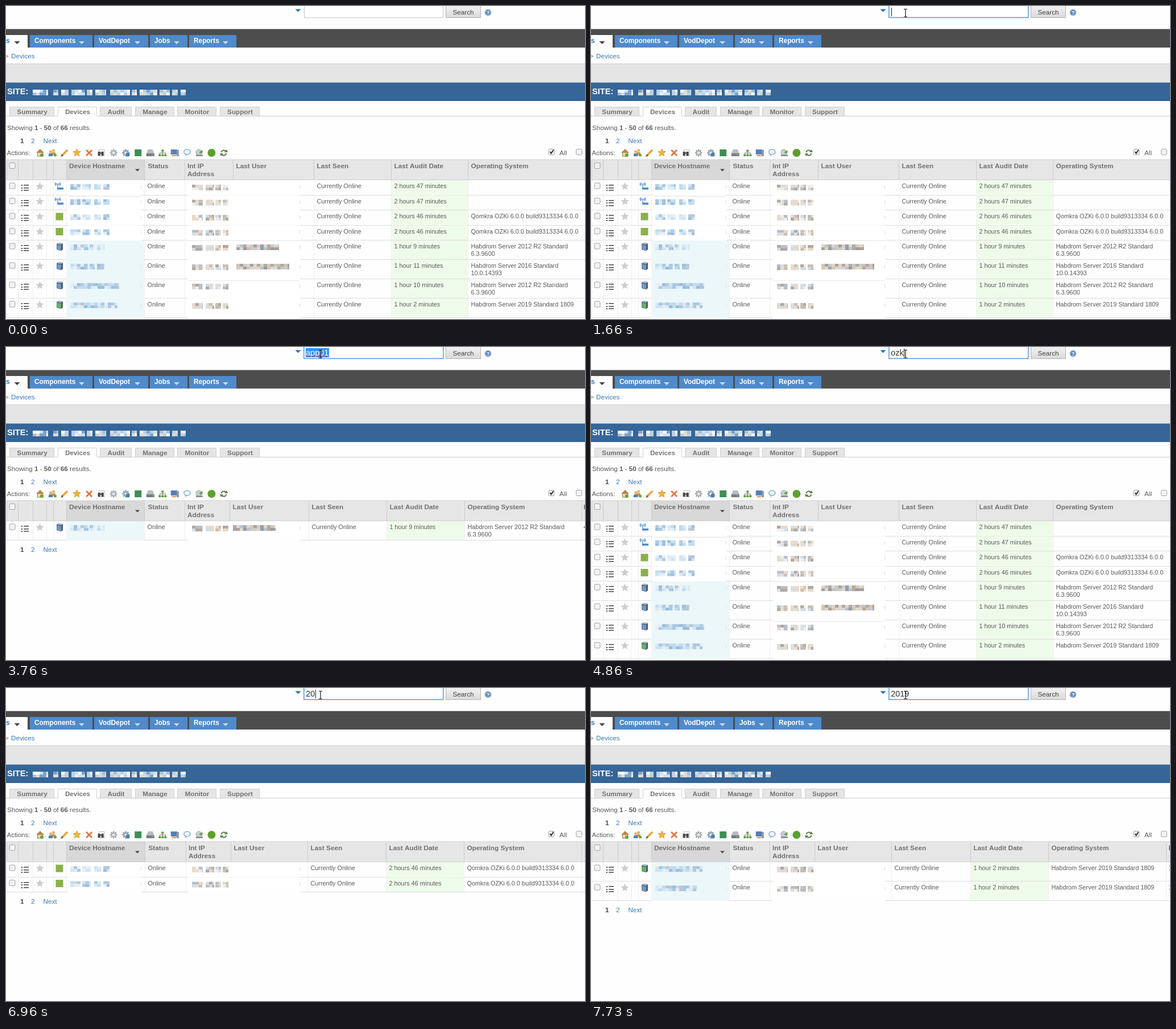
An HTML page with a canvas that plays this animation: 1018x550 px, repeating every 8 s.

```html
<!DOCTYPE html>
<html lang="en">
<head>
<meta charset="utf-8">
<title>Device list search</title>
<style>
html, body { margin: 0; width: 100%; height: 100%; overflow: hidden; background: #fff; }
canvas { display: block; }
</style>
</head>
<body>
<canvas id="stage" width="1018" height="550"></canvas>
<script>
const ctx = document.getElementById('stage').getContext('2d');
const LOOP = 8000;
const FONT = '"Liberation Sans", Arial, sans-serif';
const LINK = '#3a78b8';

// ---- drawing helpers
function box(x, y, w, h, fill) { ctx.fillStyle = fill; ctx.fillRect(x, y, w, h); }
function frame(x, y, w, h, color, width = 1) {
  ctx.strokeStyle = color; ctx.lineWidth = width; ctx.strokeRect(x, y, w, h);
}
function text(s, x, y, color = '#5a5a5a', size = 10.85, bold = false) {
  ctx.font = `${bold ? 'bold ' : ''}${size}px ${FONT}`;
  ctx.fillStyle = color;
  ctx.fillText(s, x, y);
  return x + ctx.measureText(s).width;
}
function path(points, fill, stroke, width = 1) {
  ctx.beginPath();
  for (let i = 0; i < points.length; i += 2) ctx.lineTo(points[i], points[i + 1]);
  if (fill) { ctx.closePath(); ctx.fillStyle = fill; ctx.fill(); }
  if (stroke) { ctx.strokeStyle = stroke; ctx.lineWidth = width; ctx.stroke(); }
}
function disc(x, y, r, fill, stroke, width = 1) {
  ctx.beginPath(); ctx.arc(x, y, r, 0, 7);
  if (fill) { ctx.fillStyle = fill; ctx.fill(); }
  if (stroke) { ctx.strokeStyle = stroke; ctx.lineWidth = width; ctx.stroke(); }
}
function down(x, y, r, fill) { path([x - r, y, x + r, y, x, y + r], fill); }
function star(x, y, r, fill, stroke) {
  const points = [];
  for (let i = 0; i < 10; i++) {
    const a = i * Math.PI / 5 - Math.PI / 2, d = i % 2 ? r * 0.45 : r;
    points.push(x + d * Math.cos(a), y + d * Math.sin(a));
  }
  points.push(points[0], points[1]);
  path(points, fill, stroke, 0.8);
}
function checkbox(x, y, checked) {
  ctx.beginPath(); ctx.roundRect(x - 4.5, y - 4.5, 10, 10, 2);
  ctx.fillStyle = '#f2f2f2'; ctx.fill();
  ctx.strokeStyle = '#a3a3a3'; ctx.lineWidth = 1; ctx.stroke();
  if (checked) path([x - 2, y, x, y + 3, x + 4, y - 3], null, '#333', 2);
}
const noise = n => { const v = Math.sin(n * 12.9898) * 43758.5453; return v - Math.floor(v); };

const PALETTE = {
  site: ['#ffffff', '#cfe0ef', '#a5c1dc', '#7ba3cc', '#e9eff5', '#b9d0e5', '#dedcd2'],
  host: ['#dbe8f3', '#a9c8e2', '#cfe3f2', '#9bbedd', '#e5eff7', '#b9c9d8', '#c0dcf0'],
  ip: ['#e5ddd5', '#cdbfb1', '#d5dde3', '#b9bec5', '#eeeeee', '#afa9a3', '#e8d9c8'],
  user: ['#d3c7b8', '#a9a29a', '#c5ccd5', '#989ca2', '#ddd7cf', '#b5aa9b', '#b9c3d0']
};
// Two rows of blocks over each [from, to] span
function mosaic(y, spans, palette, seed, size = 5) {
  for (const [from, to] of spans)
    for (let x = from; x < to; x += 6)
      for (let r = 0; r < 2; r++) {
        const color = palette[Math.floor(noise(x * 1.7 + r * 31 + seed * 7.3) * palette.length)];
        box(x, y + r * size, Math.min(6, to - x), size, color);
      }
}

// ---- table content
const netHost = [[113, 131], [134, 149], [155, 167], [171, 182]];
const appHost = [[113, 145], [147, 156], [160, 173]];
const longIp = [[327, 346], [351, 366], [368, 378], [381, 391]];
const hypervisor = ['Qomkra OZKi 6.0.0 build9313334 6.0.0'];
const server = (name, ...more) => ['Habdrom Server ' + name, ...more];
const old = server('2012 R2 Standard', '6.3.9600');

const row = (seed, icon, host, audit, os, user = 0) =>
  ({ seed, icon, host, audit, os, user, height: icon === 'net' || icon === 'hyper' ? 26.5 : 34 });
const net1 = row(1, 'net', netHost, '2 hours 47 minutes', []);
const net2 = row(2, 'net', netHost, '2 hours 47 minutes', []);
const hyper1 = row(3, 'hyper', netHost, '2 hours 46 minutes', hypervisor);
const hyper2 = row(4, 'hyper', netHost, '2 hours 46 minutes', hypervisor);
const app1 = row(5, 'server', appHost, '1 hour 9 minutes', old, 75);
const app2 = row(6, 'server', appHost, '1 hour 11 minutes', server('2016 Standard', '10.0.14393'), 93);
const plain = row(7, 'server', [[113, 199]], '1 hour 10 minutes', old);
const new1 = row(8, 'greenServer', [[113, 196]], '1 hour 2 minutes', server('2019 Standard 1809'));
const new2 = row(9, 'server', [[113, 186]], '1 hour 2 minutes', server('2019 Standard 1809'));

// cols: left edges of status, address, user, seen, audit, system, next column
const fullCols = [243, 314, 399, 541, 677, 812, 1030];
const views = {
  all: { rows: [net1, net2, hyper1, hyper2, app1, app2, plain, new1], cols: fullCols, full: true },
  app: { rows: [app1, app2], cols: [243, 314, 393, 534, 671, 808, 1013] },
  app01: { rows: [app1], cols: [243, 314, 393, 532, 669, 806, 1012], extra: '4' },
  hyper: { rows: [hyper1, hyper2], cols: [244, 316, 395, 530, 668, 805, 1012] },
  servers: { rows: [app1, app2, plain, new1, new2, plain, new1], cols: fullCols, full: true },
  new: { rows: [new1, new2], cols: [243, 314, 393, 528, 667, 804, 1011], extra: '1' }
};

// ---- timelines
const viewSteps = [[0, 'all'], [2740, 'app'], [2970, 'app01'], [4860, 'all'],
  [5010, 'hyper'], [7120, 'servers'], [7270, 'new']];
// time, typed text, caret index (-1 hidden), selected
const inputSteps = [
  [0, '', -1], [1660, '', 0], [2190, 'a', 1], [2450, 'ap', 2], [2590, 'app', 3], [2740, 'app0', 4],
  [2820, 'app01', 5], [3370, 'app01', -1], [3700, 'app01', 3], [3760, 'app01', -1, true],
  [4620, 'oz', 2], [4860, 'ozk', 3], [5560, 'ozk', -1], [5880, 'ozk', -1, true],
  [6960, '20', 2], [7040, '201', 3], [7190, '2019', 4], [7730, '2019', -1]
];
const stepAt = (steps, t) => steps.filter(s => s[0] <= t).pop();

// ---- page parts
function searchBar(t) {
  const [, typed, caret, selected] = stepAt(inputSteps, t);
  down(513.5, 5.5, 5, '#2374bb');
  box(524, 0, 245, 20, '#fff');
  if (t < 1660) frame(524.5, -3.5, 244, 24, '#c6c6c6');
  else frame(523.8, -3, 245, 23.3, '#6a9fe8', 1.7);
  ctx.font = `14.4px ${FONT}`;
  const widthOf = n => ctx.measureText(typed.slice(0, n)).width;
  const caretX = Math.round(527.5 + widthOf(Math.max(caret, 0)));
  if (selected) box(527, 2, widthOf(typed.length) + 1, 16, '#3390ff');
  text(typed, 527.3, 15, selected ? '#fff' : '#333', 14.4);
  if (selected && typed === 'app01') path([528, 17, 566, 17], null, '#d33a4a', 1);
  if (caret >= 0) box(caretX, 3, 1, 15, '#222');

  const g = ctx.createLinearGradient(0, 0, 0, 21);
  g.addColorStop(0, '#f1f1f1'); g.addColorStop(1, '#d9d9d9');
  box(773, 0, 62, 21, g);
  frame(773.5, -3, 61, 23.5, '#b5b5b5');
  text('Search', 785.5, 14.5, '#444', 11.7);
  disc(847.5, 11.5, 5.5, '#5a88be', '#b4c7dc', 1.5);
  text('?', 844.8, 15, '#fff', 9.5, true);
}

function navigation() {
  box(0, 40.5, 1018, 32.5, '#4d4d4d');
  box(0, 51, 38, 22, '#fff');
  text('s', 0, 65, LINK, 11.9, true);
  down(19.5, 62, 5, '#444');
  const tabs = [['Components', 42, 152, 50], ['VodDepot', 155, 250, 163], ['Jobs', 253, 319, 261], ['Reports', 322, 405, 330]];
  for (const [label, from, to, x] of tabs) {
    box(from, 51, to - from, 22, '#4f8aca');
    text(label, x, 65, '#fff', 11.85, true);
    down(to - 19, 62, 5, '#c8dcf0');
  }
  text('>', -2, 92, '#777', 11.7);
  text('Devices', 9, 92, LINK, 11.7);
  box(0, 101, 1018, 33.5, '#e5e5e5');
  box(0, 101, 1018, 1, '#cfcfcf');
  box(0, 134.5, 1018, 32.5, '#366598');
  text('SITE:', 2, 155, '#fff', 14.6, true);
  mosaic(147, [[47, 74], [83, 92], [97, 110], [115, 139], [142, 152], [157, 176], [183, 218],
    [221, 230], [235, 266], [270, 288], [292, 302], [307, 316]], PALETTE.site, 3);

  box(0, 193, 1018, 1, '#cccccc');
  const subTabs = [['Summary', 6, 85], ['Devices', 91, 160], ['Audit', 165, 221],
    ['Manage', 227, 296], ['Monitor', 301, 370], ['Support', 376, 446]];
  ctx.textAlign = 'center';
  for (const [label, from, to] of subTabs) {
    const active = label === 'Devices';
    box(from, 177, to - from, active ? 17 : 16, active ? '#fff' : '#e5e5e5');
    path([from + .5, 193, from + .5, 177.5, to - .5, 177.5, to - .5, 193], null, '#d0d0d0');
    text(label, (from + to) / 2 + .5, 190, '#737373', 11.7, true);
  }
  ctx.textAlign = 'left';
}

function pages(y) {
  text('1', 25, y, '#444', 11.7, true);
  text('2', 44, y, LINK, 11.7);
  text('Next', 65.5, y, LINK, 11.7);
}

function person(x, y, color) {
  disc(x, y - 3, 2.6, '#e3b27a');
  path([x - 4, y + 5, x - 3, y, x + 3, y, x + 4, y + 5], color);
}
function gear(x, y, color) {
  for (let i = 0; i < 8; i++) {
    const a = i * Math.PI / 4, c = Math.cos(a), s = Math.sin(a);
    path([x + 3 * c, y + 3 * s, x + 6.5 * c, y + 6.5 * s], null, color, 2.5);
  }
  disc(x, y, 3.6, '#e4e7ea', color, 2);
}
const tools = [
  (x, y) => {
    box(x - 4.5, y - 1, 9, 7, '#eadbb0'); frame(x - 4.5, y - 1, 9, 7, '#9a7b45');
    path([x - 7, y, x, y - 7, x + 7, y], '#b9834c'); disc(x + 3, y + 4, 3, '#5fa83c');
  },
  (x, y) => { person(x + 2, y - 1, '#d99a2b'); person(x - 3, y + 1, '#4f83b8'); disc(x + 5, y + 4, 2.5, '#62a83f'); },
  (x, y) => { path([x - 5, y + 5, x + 5, y - 5], null, '#e8a33c', 3.5); path([x - 7, y + 7, x - 5, y + 2, x - 2, y + 5], '#7d5a3a'); },
  (x, y) => star(x, y, 7, '#f2b632', '#c98b1c'),
  (x, y) => { path([x - 5, y - 5, x + 5, y + 5], null, '#e0743c', 2.6); path([x + 5, y - 5, x - 5, y + 5], null, '#e0743c', 2.6); },
  (x, y) => {
    box(x - 5, y - 6, 11, 12, '#f6f6f6'); frame(x - 4.5, y - 5.5, 10, 11, '#c4c4c4');
    box(x - 6, y - 2, 4, 7, '#444'); box(x, y - 2, 4, 7, '#444'); box(x - 3, y - 1, 4, 3, '#666');
  },
  (x, y) => gear(x, y, '#a5abb0'),
  (x, y) => { gear(x, y, '#8e9dad'); disc(x + 3.5, y + 3, 3.5, '#4680be'); },
  (x, y) => box(x - 6, y - 6, 12, 12, '#3f8f55'),
  (x, y) => { path([x - 7, y + 1, x - 4, y - 6, x + 4, y - 6, x + 7, y + 1], '#b9bcc0'); box(x - 7, y + 1, 14, 5, '#777c82'); box(x + 2, y + 3, 3, 1, '#8fd060'); },
  (x, y) => {
    path([x - 5, y + 4, x - 5, y, x + 5, y, x + 5, y + 4], null, '#777'); path([x, y - 4, x, y + 4], null, '#777');
    for (const [dx, dy] of [[0, -4], [-5, 4], [0, 4], [5, 4]]) box(x + dx - 2, y + dy - 1.5, 4, 3.5, '#5a9c3c');
  },
  (x, y) => { box(x - 7, y - 6, 11, 9, '#4b82c2'); frame(x - 6.5, y - 5.5, 10, 8, '#71879c'); box(x + 3, y - 5, 4, 11, '#8797a8'); box(x - 5, y + 4, 7, 2, '#d69145'); },
  (x, y) => {
    ctx.beginPath(); ctx.roundRect(x - 5.5, y - 5.5, 11, 8, 4);
    ctx.fillStyle = '#f1f7fd'; ctx.fill(); ctx.strokeStyle = '#5b91cb'; ctx.lineWidth = 1.2; ctx.stroke();
    path([x - 3, y + 2, x - 3, y + 6, x + 1, y + 2], '#7ba7d6');
  },
  (x, y) => { disc(x - 1, y - 1, 5, '#c9ced3', '#9aa2aa'); path([x - 1, y - 1, x + 6, y - 5, x + 5, y + 2], '#64a346'); box(x - 6, y + 3, 12, 3, '#8e9499'); },
  (x, y) => disc(x, y, 7, '#5ba02c'),
  (x, y) => {
    ctx.strokeStyle = '#62804e'; ctx.lineWidth = 2.2;
    ctx.beginPath(); ctx.arc(x, y, 4.5, 3.3, 5.6); ctx.stroke();
    ctx.beginPath(); ctx.arc(x, y, 4.5, 0.2, 2.5); ctx.stroke();
    path([x + 1, y - 1, x + 7, y - 1, x + 5, y - 6], '#62804e'); path([x - 1, y + 1, x - 7, y + 1, x - 5, y + 6], '#62804e');
  }
];

function toolbar() {
  let x = 2;
  for (const [part, bold] of [['Showing ', false], ['1', true], [' - ', false], ['50', true], [' of ', false], ['66', true], [' results.', false]])
    x = text(part, x, 218, '#5a5a5a', 11.65, bold);
  pages(241);
  text('Actions:', 1.5, 262, '#5a5a5a', 11.5);
  tools.forEach((draw, i) => draw(60 + i * 21.53, 258));
  checkbox(958.5, 256, true);
  text('All', 973, 262, '#5a5a5a', 11.7);
  checkbox(1007, 256);
}

function deviceIcon(kind, x, y) {
  if (kind === 'net') {
    box(x - 4, y + 2, 11, 3.5, '#4b8bc9');
    path([x - 3, y + 2, x - 3, y - 5], null, '#4b8bc9', 1.3);
    for (const r of [2.5, 4.5]) for (const a of [-0.7, 2.44]) {
      ctx.beginPath(); ctx.arc(x - 3, y - 4, r, a, a + 1.4); ctx.stroke();
    }
  } else if (kind === 'hyper') {
    box(x - 6.5, y - 6.5, 13, 13, '#8bb14a');
  } else {
    const green = kind === 'greenServer';
    path([x - 5, y - 5, x - 2, y - 7, x + 6, y - 6, x + 6, y + 5, x + 3, y + 7, x - 5, y + 5], '#465d7c');
    path([x - 5, y - 5, x - 2, y - 7, x + 6, y - 6, x + 3, y - 4], '#a9bbcd');
    path([x - 4.5, y - 4, x + 3, y - 3, x + 3, y + 6, x - 4.5, y + 4.5], green ? '#4fa34b' : '#5f84b5');
    for (let i = 0; i < 3; i++) path([x - 4.5, y - 1.5 + i * 2.5, x + 3, y - .5 + i * 2.5], null, green ? '#a5d295' : '#a9c0dd', 0.8);
  }
}

function tableHead(cols, extra) {
  box(1, 270, 1017, 35, '#e6e6e6');
  box(106, 270, cols[0] - 106, 35, '#d8d8d8');
  box(1, 269.5, 1017, 1, '#d0d0d0');
  box(1, 305, 1017, 1, '#d0d0d0');
  for (const x of [1, 21, 47, 71, 83, 106, ...cols]) box(x, 270, 1, 35, '#cccccc');
  checkbox(10.5, 280);
  const head = (s, x, y = 285) => text(s, x, y, '#707070', 11.8, true);
  head('Device Hostname', 111);
  down(231, 286.5, 4, '#444');
  head('Status', cols[0] + 6.5);
  head('Int IP', cols[1] + 5);
  head('Address', cols[1] + 5, 299);
  ['Last User', 'Last Seen', 'Last Audit Date', 'Operating System'].forEach((s, i) => head(s, cols[i + 2] + 5.5));
  if (extra) head('I', 1015.5);
}

function tableRow(item, top, view) {
  const { cols, extra } = view, { height, seed, user } = item;
  const isServer = height > 30, base = top + 15, bottom = Math.round(top + height);
  box(cols[4] + 1, top + 1, cols[5] - cols[4] - 1, height - 1, '#effbea');
  for (const x of [1, 21, 47, 71, 83, 106, ...cols])
    if (x < 320 || x > 517) box(x, top + 1, 1, height, '#f0f0f0');
  box(1, bottom, 1017, 1, '#dddddd');
  if (isServer) box(106, top + 1, cols[0] - 106, height, '#ecf7fa');
  else box(108, top + 1, 130, height, '#fff');
  box(320, top + 1, 197, height, '#fff');

  checkbox(10.5, top + 10.5);
  for (let i = 0; i < 3; i++) {
    box(27, Math.round(top + 9 + i * 4.5), 2, 2, '#444');
    box(31, Math.round(top + 9 + i * 4.5), 9, 1.5, '#444');
  }
  star(59.5, top + 12, 7.5, '#cdcdcd');
  deviceIcon(item.icon, 94, top + 12);
  mosaic(top + 8, item.host, PALETTE.host, seed);
  mosaic(top + 9, longIp, PALETTE.ip, seed);
  if (user) mosaic(top + 8, [[cols[2] + 6, cols[2] + 6 + user]], PALETTE.user, seed);
  box(237, top + 10, 1, 6, '#dde6ea');
  box(516, top + 10, 1, 6, '#dddddd');
  text('Online', cols[0] + 5.5, base);
  text('Currently Online', cols[3] + 5.5, base);
  text(item.audit, cols[4] + 5.5, base);
  item.os.forEach((line, i) => text(line, cols[5] + 5.5, base + i * 12.5));
  if (extra) text(extra, 1015.5, base);
}

function table(view) {
  let top = 305;
  for (const item of view.rows) { tableRow(item, top, view); top += item.height; }
  tableHead(view.cols, view.extra);
  if (!view.full) pages(top + 21);
  if (view === views.all) {
    box(110, 334, 128, 1, '#e2e2e2');
    box(320, 412, 197, 1, '#e2e2e2');
    box(320, 482, 197, 1, '#e8e8e8');
  }
}

function pointer(t) {
  if (t < 800) return;
  const step = Math.min(9, Math.floor((t - 800) / 78.8));
  const p = 1 - (1 - step / 9) ** 2;
  const swing = Math.sin(Math.PI * p);
  const x = 995 - 442 * p - 38 * swing * p, y = 259 - 247 * p - 12 * swing;
  if (y < 21 && x > 524 && x < 769) {
    path([x, y - 6, x, y + 7], null, '#111', 1.2);
    for (const dy of [-6.5, 7]) path([x - 3, y + dy, x + 3, y + dy], null, '#111', 1);
  } else {
    const shape = [0, 0, 0, 16, 4, 12.5, 7, 18.5, 9, 17.5, 6.5, 12, 11.5, 12, 0, 0];
    path(shape.map((v, i) => v + (i % 2 ? y : x)), '#fff', '#111', 1);
  }
}

function draw(t) {
  box(0, 0, 1018, 550, '#fefefe');
  searchBar(t);
  navigation();
  toolbar();
  table(views[stepAt(viewSteps, t)[1]]);
  pointer(t);
}

const start = performance.now();
function tick() {
  draw((performance.now() - start) % LOOP);
  requestAnimationFrame(tick);
}
tick();
</script>
</body>
</html>
```
